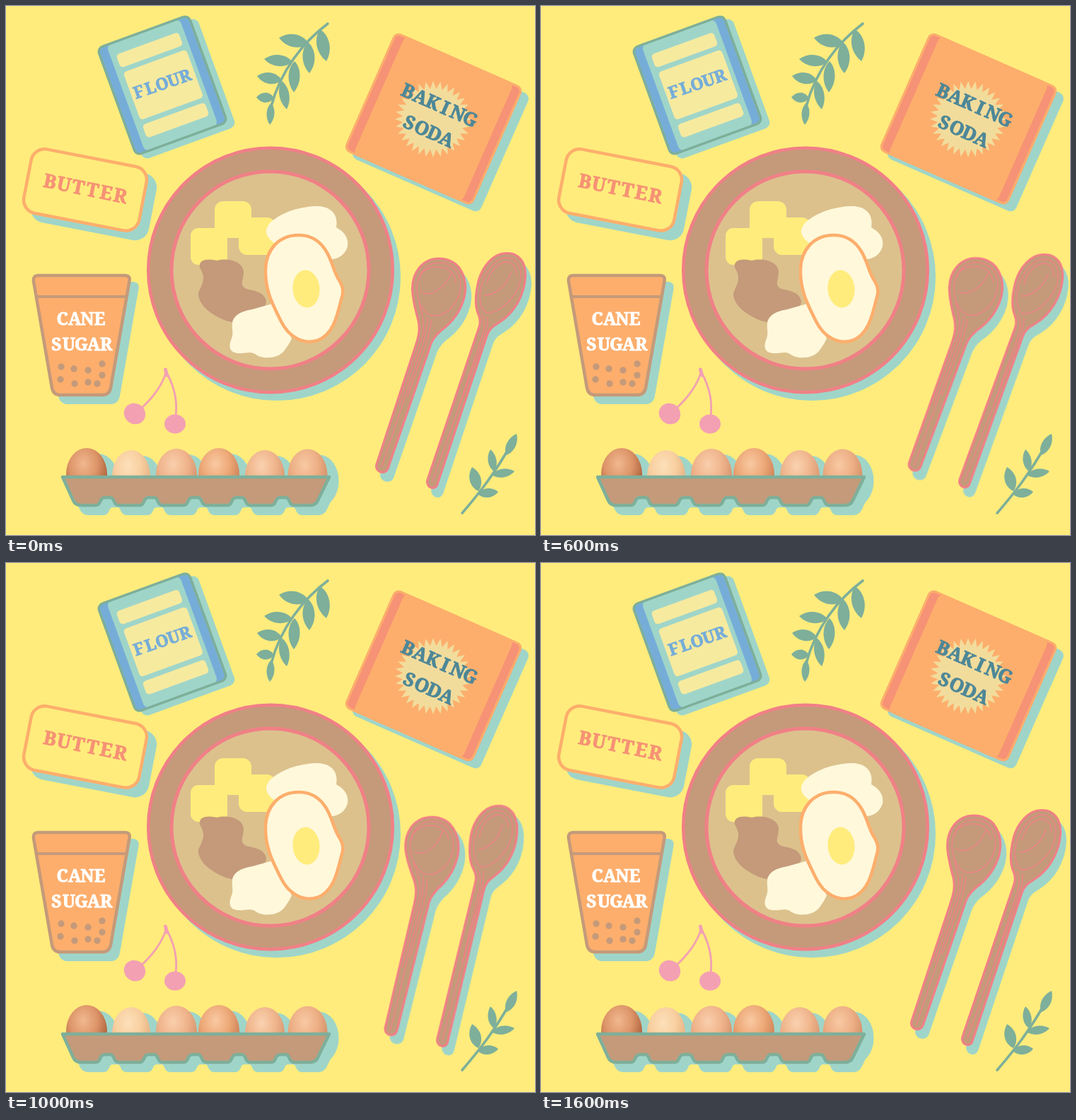
An HTML page that plays this animation: 748 px wide and 748 px high, repeating every 1.7 s.

```html
<!DOCTYPE html>
<html lang="en">
<head>
<meta charset="utf-8">
<title>Baking table</title>
<style>
  html, body { margin: 0; width: 100%; height: 100%; overflow: hidden; background: #ffec7c; }
  svg { display: block; width: 100vw; height: 100vh; }
  text { font-family: "Noto Serif", "Liberation Serif", serif; font-weight: 700; text-anchor: middle; }
  #spoons { transform-origin: 632px 512px; }
</style>
</head>
<body>
<svg id="stage" viewBox="0 0 748 748" xmlns="http://www.w3.org/2000/svg"></svg>
<script>
const C = {
  bg: '#ffec7c', shade: '#9fd5c9', green: '#7eaf9a', blue: '#76add8', orange: '#fdae6c',
  coral: '#f69275', brown: '#c49a7a', pink: '#f08086', tan: '#dcc18d', cream: '#fff8db',
  butter: '#ffec7c', label: '#f6ea9f', burst: '#f2dc9c', ink: '#4d8797', cherry: '#f3a0b3'
};

const path = (d, fill, extra = '') => `<path d="${d}" fill="${fill}" ${extra}/>`;
const line = (color, width) => `stroke="${color}" stroke-width="${width}" stroke-linecap="round" stroke-linejoin="round"`;
const oval = (x, y, rx, ry, fill, extra = '') =>
  `<ellipse cx="${x}" cy="${y}" rx="${rx}" ry="${ry}" fill="${fill}" ${extra}/>`;
const box = (x, y, w, h, r, fill, extra = '') =>
  `<rect x="${x}" y="${y}" width="${w}" height="${h}" rx="${r}" fill="${fill}" ${extra}/>`;
const at = (x, y, angle, body) => `<g transform="translate(${x} ${y}) rotate(${angle})">${body}</g>`;

// One word set on a fixed pitch, centred on (x, y)
function word(str, x, y, angle, pitch, size, fill) {
  const xs = [...str].map((c, i) => ((i - (str.length - 1) / 2) * pitch).toFixed(2)).join(' ');
  return at(x, y, angle,
    `<text x="${xs}" y="${size * 0.357}" font-size="${size}" fill="${fill}" ${line(fill, 0.9)}>${str}</text>`);
}

// Pointed leaf from base to tip, w is the half width
function leaf(x1, y1, x2, y2, w) {
  const dx = x2 - x1, dy = y2 - y1, len = Math.hypot(dx, dy);
  const nx = -dy / len * w * 1.33, ny = dx / len * w * 1.33;
  const p = (k, s) => `${(x1 + dx * k + nx * s).toFixed(1)} ${(y1 + dy * k + ny * s).toFixed(1)}`;
  return path(`M${x1} ${y1}C${p(.25, 1)} ${p(.7, 1)} ${x2} ${y2}C${p(.7, -1)} ${p(.25, -1)} ${x1} ${y1}Z`, C.green);
}

function branch(stem, width, leaves) {
  return path(stem, 'none', line(C.green, width)) + leaves.map(l => leaf(...l)).join('');
}

function flour() {
  return at(232, 117, -20, box(-70, -82, 140, 164, 9, C.shade)) +
    at(221, 112, -20,
      box(-68.5, -80.5, 137, 161, 8, C.blue) +
      box(-55, -80.5, 110, 161, 8, C.shade) +
      box(-68.5, -80.5, 137, 161, 8, 'none', line(C.green, 3.5)) +
      box(-47, -63, 94, 20, 5, C.label) +
      box(-46, -36, 95, 72, 5, C.label) +
      box(-46, 43, 94, 20, 5, C.label)) +
    word('FLOUR', 220.5, 110, -19, 17.3, 23.5, C.blue);
}

function soda() {
  const n = 32, pts = [];
  for (let i = 0; i < n * 2; i++) {
    const a = i * Math.PI / n, r = i % 2 ? 43 : 54;
    pts.push((604 + r * Math.sin(a)).toFixed(1) + ' ' + (160 - r * Math.cos(a)).toFixed(1));
  }
  return at(614.5, 170, 23.7, box(-99, -91, 198, 182, 9, C.shade)) +
    at(604.5, 159.6, 23.7,
      box(-99, -91.5, 198, 183, 9, C.coral) +
      box(-84, -91.5, 168, 183, 8, C.orange) +
      box(-97.5, -90, 195, 180, 8, 'none', line(C.orange, 3))) +
    `<polygon points="${pts.join(' ')}" fill="${C.burst}"/>` +
    word('BAKING', 612.5, 140, 24, 19.2, 26.5, C.ink) +
    word('SODA', 597, 176.5, 24, 19.2, 26.5, C.ink);
}

function butter() {
  return at(124, 271.5, 11, box(-85, -48, 170, 96, 20, C.shade)) +
    at(112, 260, 11, box(-83, -46, 166, 92, 19, C.butter, line(C.orange, 4.5))) +
    word('BUTTER', 112, 258, 11.5, 20.3, 27, C.coral);
}

function sugar() {
  const cup = 'M46 381H168Q176 381 174.5 389L148 540Q146 550 136 550H77Q67 550 65 540L39 389Q38 381 46 381Z';
  const dots = [[78, 510], [96, 513], [116, 515], [136, 506], [77, 528], [97, 534], [116, 532], [129, 534], [136, 522]];
  return path(cup, C.shade, 'transform="translate(11 11)" ' + line(C.shade, 4)) +
    path(cup, C.orange, line(C.brown, 4.5)) +
    path('M43 411H170', 'none', line(C.brown, 4)) +
    dots.map(([x, y]) => oval(x, y, 4.7, 4.7, C.brown)).join('') +
    word('CANE', 106, 442.5, 0, 17.6, 24.5, '#fff') +
    word('SUGAR', 106.5, 478.5, 0, 17.6, 24.5, '#fff');
}

function bowl() {
  return oval(383, 383, 175, 175, C.shade) +
    oval(374, 373.5, 172.8, 172.8, C.brown, line(C.pink, 4.5)) +
    oval(373.5, 373.5, 139.5, 139.5, C.tan, line(C.pink, 5)) +
    box(295, 276, 52, 52, 12, C.butter) + box(261, 314, 52, 52, 11, C.butter) + box(329, 299, 52, 53, 12, C.butter) +
    path('M313 314V328H329V299H313Z', C.butter) +
    path('M274 370C272 358 285 357 298 360C312 356 334 360 336 375C336 390 329 394 340 400C352 403 363 404 367 414C371 424 361 430 350 434C336 440 330 447 319 447C300 443 271 426 272 406C277 393 284 386 274 370Z', C.brown) +
    path('M372 308C390 290 420 283 441 283C462 284 470 297 467 313C478 319 485 328 483 340C479 354 466 360 452 358L400 345C385 340 366 330 368 316Z', C.cream) +
    path('M348 429C335 431 322 436 320 448C319 458 322 462 319 470C314 482 316 491 330 491C340 491 345 488 352 492C362 500 384 499 393 488C398 481 401 477 404 470L380 420Z', C.cream) +
    path('M414 324C435 324 447 337 453 347C462 362 463 375 470 386C477 397 478 404 474 415C468 440 462 465 440 473C420 479 400 468 389 446C377 422 366 402 367 372C368 345 385 324 414 324Z', C.cream, line(C.orange, 4.5)) +
    oval(424.5, 400, 19, 26.5, C.butter, 'transform="rotate(-5 424.5 400)"');
}

function cherries() {
  return path('M226 518C222 535 206 556 190 570M228 520C237 537 243 556 240 580', 'none', line(C.cherry, 2.8)) +
    path('M225.5 514L227.5 522', 'none', line(C.cherry, 5)) +
    oval(182, 576.5, 15.5, 14.5, C.cherry, 'transform="rotate(35 182 576.5)"') +
    oval(239, 591, 15, 13.5, C.cherry);
}

// x, top, half width, light, middle, dark
const eggs = [
  [114, 625, 29, '#f1b88f', '#dd9468', '#b0663f'],
  [177, 628, 27, '#fde0b9', '#f8cfa0', '#e6b384'],
  [241, 626, 29, '#f9cfac', '#f0b48c', '#d6966f'],
  [301, 625, 29, '#f9c9a2', '#eda877', '#d0855a'],
  [366, 628, 28, '#fad2b0', '#f0b68d', '#d89a72'],
  [426.5, 626.5, 28, '#f8c9a3', '#edaf85', '#d4926a']
];

function carton() {
  let d = 'M80 666L95 699Q98 706 106 706';
  for (let i = 0; i < 5; i++) {
    const x = 143 + 62 * i;
    d += `H${x - 16}Q${x - 12} 706 ${x - 10} 701Q${x - 8} 695 ${x - 3} 695H${x + 4}Q${x + 8} 695 ${x + 10} 701Q${x + 12} 706 ${x + 17} 706`;
  }
  d += 'H430Q438 706 441 699L457 666Z';
  const grads = eggs.map(([, , , a, b, c], i) =>
    `<radialGradient id="egg${i}" cx=".42" cy=".3" r=".62"><stop offset="0" stop-color="${a}"/>` +
    `<stop offset=".55" stop-color="${b}"/><stop offset="1" stop-color="${c}"/></radialGradient>`).join('');
  return `<defs>${grads}</defs>` +
    eggs.map(([x, top, w]) => oval(x + 16, top + 45, w, 37, C.shade)).join('') +
    path(d, C.shade, 'transform="translate(11 12)" ' + line(C.shade, 4)) +
    eggs.map(([x, top, w], i) => oval(x, top + 37, w, 37, `url(#egg${i})`)).join('') +
    path(d, C.brown, line(C.green, 4.5));
}

function spoons() {
  const shapes = [
    'M612 357C588 357 574.500 378 574.500 400C575 418 580 432 583 445C586 458 583 468 580 478L524 648C521 660 537 663 540 654L598 486C601 474 606 467 615 459C633 446 643 430 648 412C653 390 646 377 640 369C632 360 622 357 612 357Z',
    'M708 349.500C690 349 674 367 668 389C663 410 663 425 668 436C672 446 670 452 667 460L596 670C593 681 607 686 610 676L680 466C683 456 690 452 698 447C718 434 733 410 734.500 382C735 362 725 349 708 349.500Z'
  ];
  const grain = [
    'M612 363C593 363 581 382 581 400C582 421 592 438 606 438C627 437 643 416 643 393C642 374 629 363 612 363Z',
    'M585 385C586 374 600 368 612 369C625 369 636 379 636 391',
    'M587 404C597 412 620 402 629 378M584 420C590 437 592 452 589 466L556 565M596 440C596 456 592 470 586 488L531 652M601 444C600 458 598 466 593 481L568 552',
    'M706 356C690 358 677 378 672 396C668 414 671 433 682 434C703 432 727 406 728 382C729 366 720 355 706 356Z',
    'M680 392C684 376 695 363 707 362C717 362 722 370 722 381',
    'M677 409C689 409 707 398 714 377M673 436C678 446 677 456 673 467L641 565M681 440C682 450 678 464 672 480L603 672'
  ];
  const both = shapes.join('');
  return `<g id="spoons">` +
    path(both, C.shade, 'transform="translate(7 12)" ' + line(C.shade, 3)) +
    path(both, C.brown, line(C.pink, 3.2)) +
    path(grain.join(''), 'none', line(C.pink, 1.4)) + '</g>';
}

document.getElementById('stage').innerHTML = [
  box(0, 0, 748, 748, 0, C.bg),
  flour(),
  branch('M455 25C420 51 388 92 375 142', 3.6, [
    [428, 53, 386, 45, 9], [405, 79, 365, 75, 8], [390, 105, 355, 99, 8], [379, 130, 354, 129, 7],
    [375, 137, 373, 168, 5.5], [444, 33, 453, 78, 9], [427, 51, 429, 95, 8.5], [408, 78, 407, 122, 8],
    [390, 106, 397, 146, 7]
  ]),
  soda(), butter(), sugar(), bowl(), cherries(), carton(),
  branch('M645 717C670 688 691 661 714 620', 3.6, [
    [707, 635, 722, 605, 6.5], [690, 658, 685, 627, 6], [687, 663, 719, 658, 6],
    [668, 686, 659, 652, 8], [667, 690, 696, 687, 6.5]
  ]),
  spoons()
].join('');

// time in ms, angle in degrees, held steps until the next key
const LOOP = 1700;
const keys = [[0, 0, 5], [500, 3, 5], [1000, -5, 6], [1600, 0, 1], [LOOP, 0, 1]];
document.getElementById('spoons').animate(
  keys.map(([t, a, n]) => ({ offset: t / LOOP, transform: `rotate(${a}deg)`, easing: `steps(${n})` })),
  { duration: LOOP, iterations: Infinity }
);
</script>
</body>
</html>
```
